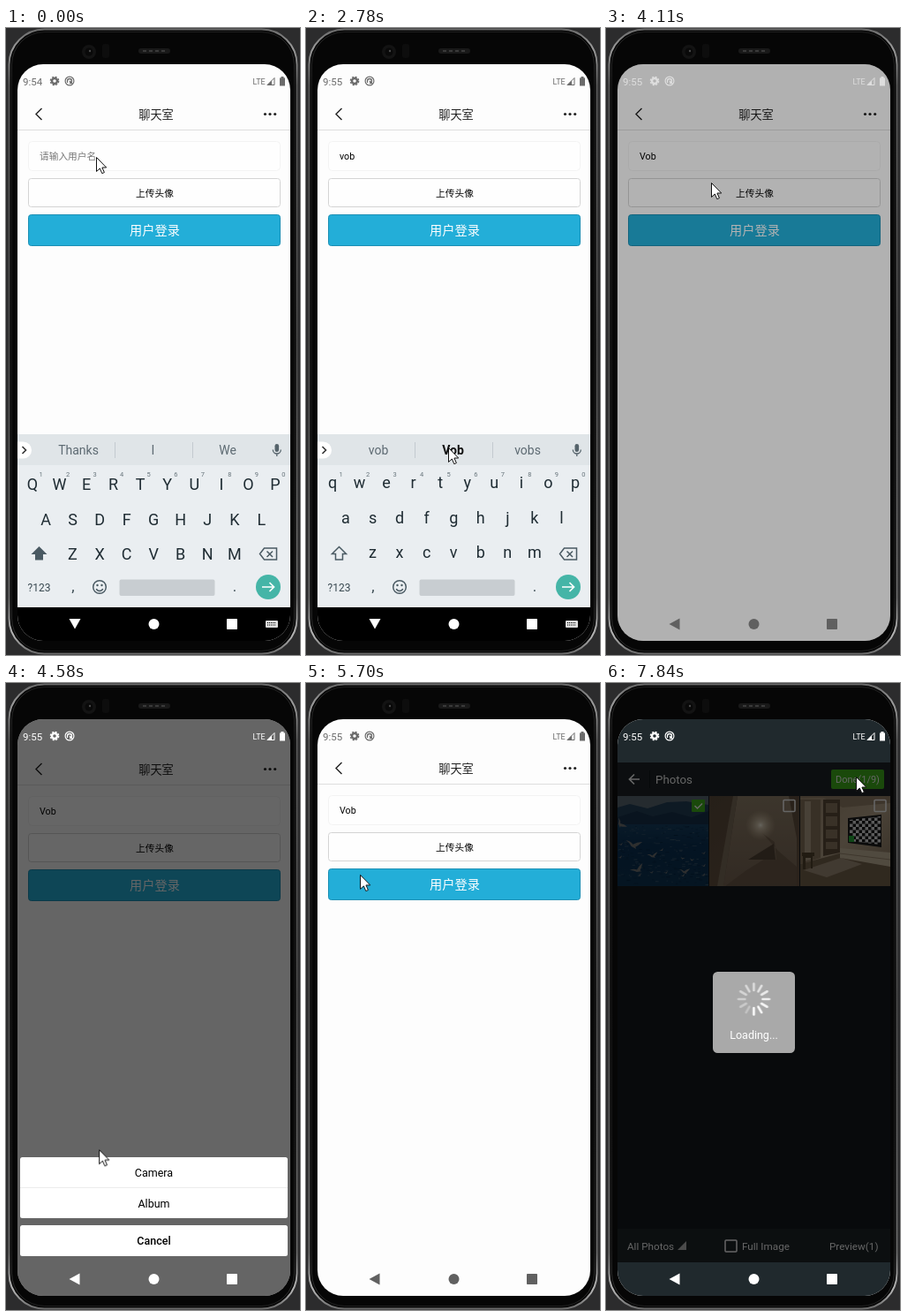
Animation, 333 px wide and 710 px high, one loop 8000 ms. Source, as an HTML page:

```html
<!DOCTYPE html>
<html lang="zh">
<head>
<meta charset="utf-8">
<title>聊天室</title>
<style>
html, body { margin: 0; width: 100%; height: 100%; overflow: hidden; background: #2a2a2a; }
svg { display: block; width: 333px; height: 710px; font-family: Roboto, 'Noto Sans CJK SC', sans-serif; }
svg svg { width: auto; height: auto; }
.mid { text-anchor: middle; }
.line { fill: none; stroke: currentColor; }
.step, .move { animation: 8s infinite linear; }
.step { animation-timing-function: step-end; }

/* typing stages */
.s0 { animation-name: s0 } .s1 { animation-name: s1 } .s2 { animation-name: s2 }
.s3 { animation-name: s3 } .s4 { animation-name: s4 }
@keyframes s0 { 0% { opacity: 1 } 8.625%, to { opacity: 0 } }
@keyframes s1 { 0% { opacity: 0 } 8.625% { opacity: 1 } 11.125%, to { opacity: 0 } }
@keyframes s2 { 0% { opacity: 0 } 11.125% { opacity: 1 } 14.25%, to { opacity: 0 } }
@keyframes s3 { 0% { opacity: 0 } 14.25% { opacity: 1 } 35.875%, to { opacity: 0 } }
@keyframes s4 { 0% { opacity: 0 } 35.875%, to { opacity: 1 } }
.upper { animation-name: upper } .lower { animation-name: lower }
@keyframes upper { 0% { opacity: 1 } 9%, to { opacity: 0 } }
@keyframes lower { 0% { opacity: 0 } 9%, to { opacity: 1 } }
.caret { animation-name: caret }
@keyframes caret {
  0% { opacity: 0 } 5.5% { opacity: 1 } 8.625% { opacity: 0; transform: translateX(18px) }
  37.875% { opacity: 1; transform: translateX(18px) } 44.125%, to { opacity: 0 }
}
.early { animation-name: early } .late { animation-name: late }
@keyframes early { 0% { opacity: 1 } 33%, to { opacity: 0 } }
@keyframes late { 0% { opacity: 0 } 33%, to { opacity: 1 } }

/* keyboard, sheet and pages */
.pressed { animation-name: pressed }
@keyframes pressed { 0% { fill: #fefefe } 46.125% { fill: #ececec } 48.75%, to { fill: #fefefe } }
.keyboard { animation-name: keyboard }
@keyframes keyboard {
  0%, 46.125% { opacity: 1; transform: none }
  48.5%, to { opacity: 0; transform: translateY(70px) }
}
.navdown { animation-name: navdown } .navback { animation-name: navback }
@keyframes navdown { 0%, 47% { opacity: 1 } 48.5%, to { opacity: 0 } }
@keyframes navback { 0%, 47% { opacity: 0 } 48.5%, to { opacity: 1 } }
.navcolor { animation-name: navcolor }
@keyframes navcolor {
  0% { color: #606060 } 52% { color: #fff } 66.5% { color: #606060 } 72.25%, to { color: #fff }
}
.status { animation-name: status }
@keyframes status {
  0%, 50.5% { color: #6b6b6b } 51.375% { color: #dedede } 52.375%, 64.125% { color: #fff }
  68%, 72% { color: #6b6b6b } 73%, to { color: #fff }
}
.dim { animation-name: dim }
@keyframes dim {
  0%, 50.5% { opacity: 0 } 51.375% { opacity: .295 } 52.375%, 64.125% { opacity: .6 } 68.25%, to { opacity: 0 }
}
.sheet { animation-name: sheet }
@keyframes sheet {
  0%, 51.6% { transform: translateY(175px); animation-timing-function: ease-out }
  54.2%, 64.125% { transform: none; animation-timing-function: ease-in }
  66.8%, to { transform: translateY(175px) }
}
.chat { animation-name: chat }
@keyframes chat {
  0%, 70.9% { transform: none } 71.25% { transform: translateY(-1px) } 75.875%, to { transform: translateY(-13px) }
}
.album { animation-name: album }
@keyframes album {
  0%, 71.6% { clip-path: inset(653px 0 0 0); transform: translateY(27px); animation-timing-function: cubic-bezier(.2, .2, 0, 1) }
  75.875%, to { clip-path: inset(0); transform: none }
}
.none { animation-name: none-sel } .one { animation-name: one-sel }
@keyframes none-sel { 0% { opacity: 1 } 84.375%, to { opacity: 0 } }
@keyframes one-sel { 0% { opacity: 0 } 84.375%, to { opacity: 1 } }
.loading { animation-name: loading }
@keyframes loading { 0% { opacity: 0 } 92.375%, to { opacity: 1 } }
.spin { animation-name: spin }
@keyframes spin {
  0% { transform: rotate(90deg) } 94.25% { transform: rotate(120deg) }
  95.75% { transform: rotate(150deg) } 98%, to { transform: rotate(180deg) }
}
.pointer { animation-name: pointer }
@keyframes pointer {
  0%, 25.25% { transform: translate(102px, 146px) }
  26.875% { transform: translate(84px, 190px) }
  28.75% { transform: translate(115px, 330px) }
  30.875%, 32.75% { transform: translate(178px, 462px) }
  34.75%, 36.875% { transform: translate(161px, 475px) }
  39.375% { transform: translate(150px, 360px) }
  42.75%, 53.125% { transform: translate(119px, 175px) }
  54.75% { transform: translate(117px, 280px) }
  57.25% { transform: translate(105px, 528px) }
  60.625%, 64.125% { transform: translate(143px, 588px) }
  65.75% { transform: translate(107px, 415px) }
  66.75% { transform: translate(86px, 335px) }
  68.5%, 71.25% { transform: translate(61px, 217px) }
  75.875%, 78.625% { transform: translate(78px, 163px) }
  80.875%, 85.6% { transform: translate(100px, 144px) }
  89.375%, to { transform: translate(283px, 106px) }
}
</style>
</head>
<body>
<svg viewBox="0 0 333 710">
  <defs>
    <clipPath id="screen"><rect x="13" y="41" width="309" height="653" rx="29"/></clipPath>
    <linearGradient id="rim" x2="0" y2="1">
      <stop stop-color="#6a6a6a"/><stop offset=".03" stop-color="#9a9a9a"/><stop offset=".09" stop-color="#555"/>
      <stop offset=".5" stop-color="#454545"/><stop offset=".91" stop-color="#666"/>
      <stop offset=".97" stop-color="#b5b5b5"/><stop offset="1" stop-color="#6a6a6a"/>
    </linearGradient>
    <linearGradient id="sea" x2="0" y2="1">
      <stop stop-color="#2f86cc"/><stop offset=".35" stop-color="#1665ae"/><stop offset="1" stop-color="#1c6cab"/>
    </linearGradient>
    <linearGradient id="wall" x2="1" y2="1"><stop stop-color="#5f4f3e"/><stop offset="1" stop-color="#6e5947"/></linearGradient>
    <linearGradient id="panel" x2="0" y2="1"><stop stop-color="#97866f"/><stop offset="1" stop-color="#7d6957"/></linearGradient>
    <linearGradient id="room" x2="1" y2="1"><stop stop-color="#a89378"/><stop offset=".5" stop-color="#bca98e"/><stop offset="1" stop-color="#85725b"/></linearGradient>
    <radialGradient id="sun"><stop stop-color="#fffbe8"/><stop offset=".2" stop-color="#e9dcc4" stop-opacity=".8"/><stop offset="1" stop-color="#c9b597" stop-opacity="0"/></radialGradient>
    <pattern id="checker" width="7" height="7" patternUnits="userSpaceOnUse">
      <path d="M0 0H7V7H0Z" fill="#e4e4e4"/><path d="M0 0H3.5V7H7V3.5H0Z" fill="#181818"/>
    </pattern>
  </defs>

  <!-- phone body -->
  <path d="M0 0H333V710H0Z" fill="#2c2c2d"/>
  <rect x="3.5" y="1.5" width="326" height="707" rx="40" fill="#060606" stroke="url(#rim)" stroke-width="2"/>
  <rect x="6.500" y="4.500" width="320" height="701" rx="37" fill="none" stroke="url(#rim)" opacity=".25"/>
  <circle cx="94" cy="27" r="8" fill="#131313"/><circle cx="94" cy="27" r="4.500" fill="#090909"/>
  <circle cx="95" cy="26" r="1.200" fill="#4a4a4a"/>
  <rect x="109" y="18" width="8" height="16" rx="3" fill="#0d0d0d"/>
  <rect x="150" y="23" width="36" height="6" rx="3" fill="#191919"/>
  <path d="M155 26H182" stroke="#3a3a3a" stroke-width="2" stroke-dasharray="4 3"/>

  <g clip-path="url(#screen)">
    <path d="M13 41H322V694H13Z" fill="#fdfdfd"/>
    <g class="move chat">
      <path class="line" color="#222" stroke-width="1.400" d="M40.500 91L34 97.500 40.500 104"/>
      <text class="mid" x="170" y="103" font-size="13.200" fill="#222">聊天室</text>
      <g fill="#222"><circle cx="293.500" cy="97.500" r="1.600"/><circle cx="299" cy="97.500" r="1.600"/><circle cx="304.700" cy="97.500" r="1.600"/></g>
      <path d="M13 115.500H322" stroke="#dedede"/>
      <rect x="25.500" y="128.500" width="285" height="33" rx="4" fill="#fefefe" stroke="#f3f3f3"/>
      <g font-size="10.700">
        <text class="step s0" x="38" y="149" fill="#777">请输入用户名</text>
        <text class="step s1" x="38" y="149">v</text>
        <text class="step s2" x="38" y="149">vo</text>
        <text class="step s3" x="38" y="149">vob</text>
        <text class="step s4" x="38" y="149">Vob</text>
        <rect class="step caret" x="38" y="139" width="1" height="12" fill="#222"/>
        <rect class="step pressed" x="25.500" y="170.500" width="285" height="32" rx="3" fill="#fefefe" stroke="#d4d4d4"/>
        <text class="mid" x="168.500" y="191">上传头像</text>
      </g>
      <rect x="25.500" y="211.500" width="285" height="35" rx="3" fill="#23aed8" stroke="#1c8fb4"/>
      <text class="mid" x="168.500" y="234" font-size="14.200" fill="#fff">用户登录</text>
    </g>

    <g class="move keyboard">
      <path d="M13 460H322V660H13Z" fill="#eaeef1"/>
      <path d="M13 460H322V495H13Z" fill="#e0e5e8"/>
      <path d="M13 468.500H19.500A9.500 9.500 0 0 1 19.500 487.500H13Z" fill="#fff"/>
      <path class="line" d="M18.500 474L22.500 478 18.500 482" color="#333" stroke-width="1.600"/>
      <path d="M123.500 469V487M211.500 469V487" stroke="#c3cacf"/>
      <g id="hints" class="mid" font-size="14" fill="#5d6a72"></g>
      <g color="#55636b" stroke-width="1.300">
        <rect x="304.500" y="471" width="4.600" height="9" rx="2.300" fill="currentColor"/>
        <path class="line" d="M302.300 477.500A4.500 4.500 0 0 0 311.300 477.500M306.800 482V485"/>
      </g>
      <g id="nums" class="mid" font-size="7.500" fill="#66737a"></g>
      <g id="upper" class="mid step upper" font-size="18" fill="#1f2c33"><path d="M37.500 587L46.500 596H42V602.500H33V596H28.500Z" fill="#4a5a63"/></g>
      <g id="lower" class="mid step lower" font-size="18" fill="#1f2c33"><path class="line" color="#4a5a63" stroke-width="1.500" d="M37.500 587.500L45.500 595.500H41.500V602H33.500V595.500H29.500Z"/></g>
      <g class="line" color="#4a5a63" stroke-width="1.500">
        <path d="M287.500 595.500L292.500 589H306.500V602H292.500ZM295.500 592.500L302 599M302 592.500L295.500 599"/>
        <circle cx="106" cy="633" r="7.300"/><path d="M102.300 635A4 4 0 0 0 109.700 635"/>
      </g>
      <g fill="#4a5a63"><circle cx="103.500" cy="631" r="1.200"/><circle cx="108.500" cy="631" r="1.200"/></g>
      <g class="mid" fill="#37474f"><text x="37.500" y="638" font-size="12">?123</text>
        <text x="76" y="638" font-size="17">,</text><text x="259" y="638" font-size="17">.</text></g>
      <rect x="128.500" y="624.500" width="108" height="18.500" rx="2" fill="#c8cdd1"/>
      <circle cx="297" cy="633" r="14" fill="#45b5a7"/>
      <path class="line" color="#fff" stroke-width="1.700" d="M290 633H303.500M298.500 628L303.500 633 298.500 638"/>
    </g>
    <g class="move navdown">
      <path d="M13 656H322V694H13Z"/>
      <path d="M71.500 669H84.500L78 680.500Z" fill="#fff"/>
      <rect x="294" y="671" width="14" height="8" rx="1" fill="#ddd"/>
      <path d="M296 673.500H306M296 676H306" stroke="#000" stroke-dasharray="1 1"/>
    </g>

    <path class="move dim" d="M13 41H322V694H13Z"/>
    <g class="move sheet">
      <rect x="16" y="537" width="303" height="69" rx="2.500" fill="#fff"/>
      <rect x="16" y="614" width="303" height="35" rx="2.500" fill="#fff"/>
      <path d="M16 571.500H319" stroke="#ececec"/>
      <g class="mid" font-size="12.500"><text x="167.500" y="559">Camera</text><text x="167.500" y="594">Album</text>
        <text x="167.500" y="636" font-weight="500">Cancel</text></g>
    </g>

    <g class="move album">
      <path d="M13 41H322V694H13Z" fill="#20292d"/>
      <path d="M13 90H322V128H13Z" fill="#1e2528"/>
      <path d="M13 128H322V618H13Z" fill="#151b1e"/>
      <path class="line" color="#fff" stroke-width="1.700" d="M38 109H26.500M32 103.500L26.500 109 32 114.500"/>
      <path d="M49.500 99V119" stroke="#11171a"/>
      <text x="56" y="114" font-size="13.300" fill="#fff">Photos</text>
      <rect x="255" y="98" width="60" height="22" rx="2" fill="#41b71d"/>

      <svg x="13" y="128" width="103" height="102">
        <path d="M0 0H103V102H0Z" fill="#b9d8ee"/>
        <path d="M0 13L14 9 34 14 56 7 78 6 103 10V36H0Z" fill="#4b83b5"/>
        <path d="M0 24L22 17 40 23 62 18 84 24 103 17V36H0Z" fill="#2f689c"/>
        <path d="M0 32H103V102H0Z" fill="url(#sea)"/>
        <g id="ripples"></g>
        <g id="gulls" fill="#e6ebef"></g>
      </svg>
      <svg x="117" y="128" width="102" height="102">
        <path d="M0 0H102V102H0Z" fill="url(#wall)"/>
        <path d="M32 0H90L99 48V102H16Z" fill="url(#panel)"/>
        <path d="M27 0H32L16 102H9Z" fill="#80705d"/>
        <path d="M60 42L74 52 76 72 68 68 42 84 18 102H99V80L78 62Z" fill="#6b5847" opacity=".75"/>
        <path d="M44 72L73 54 75 72Z" fill="#554638"/>
        <circle cx="58" cy="33" r="17" fill="url(#sun)"/>
      </svg>
      <svg x="220" y="128" width="102" height="102">
        <path d="M0 0H102V102H0Z" fill="url(#room)"/>
        <path d="M0 0H102V8L48 13 26 2H0Z" fill="#9a866c"/>
        <path d="M0 4H23V70L0 77Z" fill="#8d7860"/>
        <path d="M5 6H12V72L5 74Z" fill="#b4a289"/>
        <path d="M26 4H45V64L26 68Z" fill="#5f4e3b"/>
        <path d="M29 8H42V19H29ZM29 23H42V34H29ZM29 38H42V48H29ZM29 52H42V60H29Z" fill="#8f7c63"/>
        <path d="M0 77L48 64 102 80V102H0Z" fill="#79664f"/>
        <path d="M4 84L46 70 70 77 30 92Z" fill="#a4927a"/>
        <path d="M45 59L102 64V80L45 70Z" fill="#c9b99f"/>
        <path d="M45 65L102 72" stroke="#9c8a70"/>
        <path d="M54 25L92 21V58L54 53Z" fill="#1c1c1c"/>
        <path d="M56 27L91 23V55L56 51Z" fill="url(#checker)"/>
        <path d="M55 45H61V52H55Z" fill="#27b03a"/>
        <path d="M2 64H16V68H14V82H12V70H6V83H3V68H2Z" fill="#54442f"/>
      </svg>

      <path class="step one" d="M13 128H116V230H13Z" fill="#000" fill-opacity=".5"/>
      <g class="line" color="#fff" stroke-width="1.500">
        <rect class="step none" x="98" y="132.500" width="13" height="13" rx="1"/>
        <rect x="201" y="132.500" width="13" height="13" rx="1"/><rect x="304" y="132.500" width="13" height="13" rx="1"/>
      </g>
      <g class="step one"><rect x="97" y="132" width="15" height="14" rx="1" fill="#41b71d"/>
        <path class="line" color="#fff" stroke-width="1.500" d="M100.500 139L103.500 142 109 136.500"/></g>

      <path d="M13 618H322V656H13Z" fill="#1f272a"/>
      <rect class="line" color="#fff" stroke-width="1.500" x="135" y="631" width="13" height="13" rx="1"/>
      <path d="M81 642H91V632Z" fill="#bbb"/>
      <g font-size="11.700" fill="#fff">
        <text x="24" y="642">All Photos</text><text x="154" y="642">Full Image</text>
        <g class="step none"><text x="253" y="642">Preview(0)</text><text class="mid" x="285" y="113" font-size="11">Done(0/9)</text></g>
        <g class="step one"><text x="253" y="642">Preview(1)</text><text class="mid" x="285" y="113" font-size="11">Done(1/9)</text></g>
      </g>
    </g>

    <g class="step loading">
      <path d="M13 90H322V656H13Z" opacity=".6"/>
      <rect x="121" y="327" width="93" height="92" rx="5.500" fill="#a9a9a9"/>
      <g transform="translate(167.500 358)"><g id="ticks" class="step spin" stroke="#fff" stroke-width="2.600" stroke-linecap="round"></g></g>
      <text class="mid" x="167.500" y="403" font-size="12.500" fill="#fff">Loading...</text>
    </g>

    <g class="move status" fill="currentColor">
      <g font-size="11.500"><text class="step early" x="19" y="65">9:54</text><text class="step late" x="19" y="65">9:55</text></g>
      <circle class="line" cx="55" cy="60" r="3" stroke-width="2.400"/>
      <circle class="line" cx="55" cy="60" r="4.700" stroke-width="1.300" stroke-dasharray="2.200 1.490"/>
      <circle class="line" cx="72" cy="60" r="4.900" stroke-width="1.200"/>
      <path class="line" d="M69.500 62V60A2.500 2.500 0 1 1 72 62.500M72 60L75 63" stroke-width="1.300"/>
      <text x="279.500" y="64" font-size="9">LTE</text>
      <path class="line" d="M296 64.500H304V56.500Z" stroke-width="1"/><path d="M295.500 65L301 59.500V65Z"/>
      <path d="M310 56.500H311.500V55H314.500V56.500H316V65.500H310Z"/>
    </g>
    <g class="move navback"><g class="step navcolor" fill="currentColor">
      <path d="M71.500 675L83.500 668.500V681.500Z"/><circle cx="167.500" cy="675" r="6"/><rect x="250" y="669" width="12" height="12" rx=".8"/>
    </g></g>
    <g class="move navdown" fill="#fff"><circle cx="167.500" cy="675" r="6"/><rect x="250" y="669" width="12" height="12" rx=".8"/></g>
  </g>

  <path class="move pointer" d="M.5 .5V16.500L4.300 13 6.800 18.700 9.400 17.500 6.900 12H11.700Z" fill="#fff" stroke="#111"/>
</svg>
<script>
const add = (id, markup) => document.getElementById(id).insertAdjacentHTML('beforeend', markup);
const label = (x, y, s, extra = '') => `<text x="${x}" y="${y}" ${extra}>${s}</text>`;

[['QWERTYUIOP', 30, 522.5], ['ASDFGHJKL', 45, 562.5], ['ZXCVBNM', 75.5, 602]].forEach(([row, x0, y], r) => {
  [...row].forEach((key, i) => {
    const x = x0 + 30.55 * i;
    add('upper', label(x, y, key));
    add('lower', label(x, y - 1.7, key.toLowerCase()));
    if (r === 0) add('nums', label(x + 9.5, 508, (i + 1) % 10));
  });
});

[['Thanks', 'I', 'We'], ['v', 'V', 'very'], ['vo', 'Vo', 'vobs'], ['vob', 'Vob', 'vobs'], ['is', 'and', 'has']].forEach((words, stage) => {
  const bold = stage > 0 && stage < 4 ? 'font-weight="700" fill="#111"' : '';
  const texts = words.map((w, i) => label([82, 166.5, 251][i], 483, w, i === 1 ? bold : ''));
  add('hints', `<g class="step s${stage}">${texts.join('')}</g>`);
});

for (let i = 0; i < 12; i++) {
  add('ticks', `<path d="M0 -10V-17.500" transform="rotate(${i * 30})" opacity="${i ? 0.25 + i / 16 : 1}"/>`);
}

let seed = 7;
const rand = () => (seed = (seed * 16807) % 2147483647) / 2147483647;
for (let i = 0; i < 220; i++) {
  const color = rand() < 0.5 ? '#8cc4ea' : '#0c4a85';
  add('ripples', `<path d="M${rand() * 101} ${34 + rand() * 67}h${1 + rand() * 4}" stroke="${color}" opacity="${0.3 + rand() * 0.5}"/>`);
}
const gull = (x, y, s, turn) =>
  `<path d="M-11 -3Q-5 -4 -1 -1Q3 -6 9 -8Q6 -2 3 1L5 3 -2 2Q-6 -2 -11 -3Z" transform="translate(${x} ${y}) rotate(${turn}) scale(${s})"/>`;
add('gulls', gull(3, 32, 0.7, 60) + gull(18, 56, 0.9, 20) + gull(40, 68, 0.6, 0) + gull(23, 84, 0.8, -15) + gull(76, 86, 0.6, 10));
for (let i = 0; i < 12; i++) add('gulls', gull(rand() * 100, 42 + rand() * 56, 0.25, rand() * 60 - 30));
</script>
</body>
</html>
```
